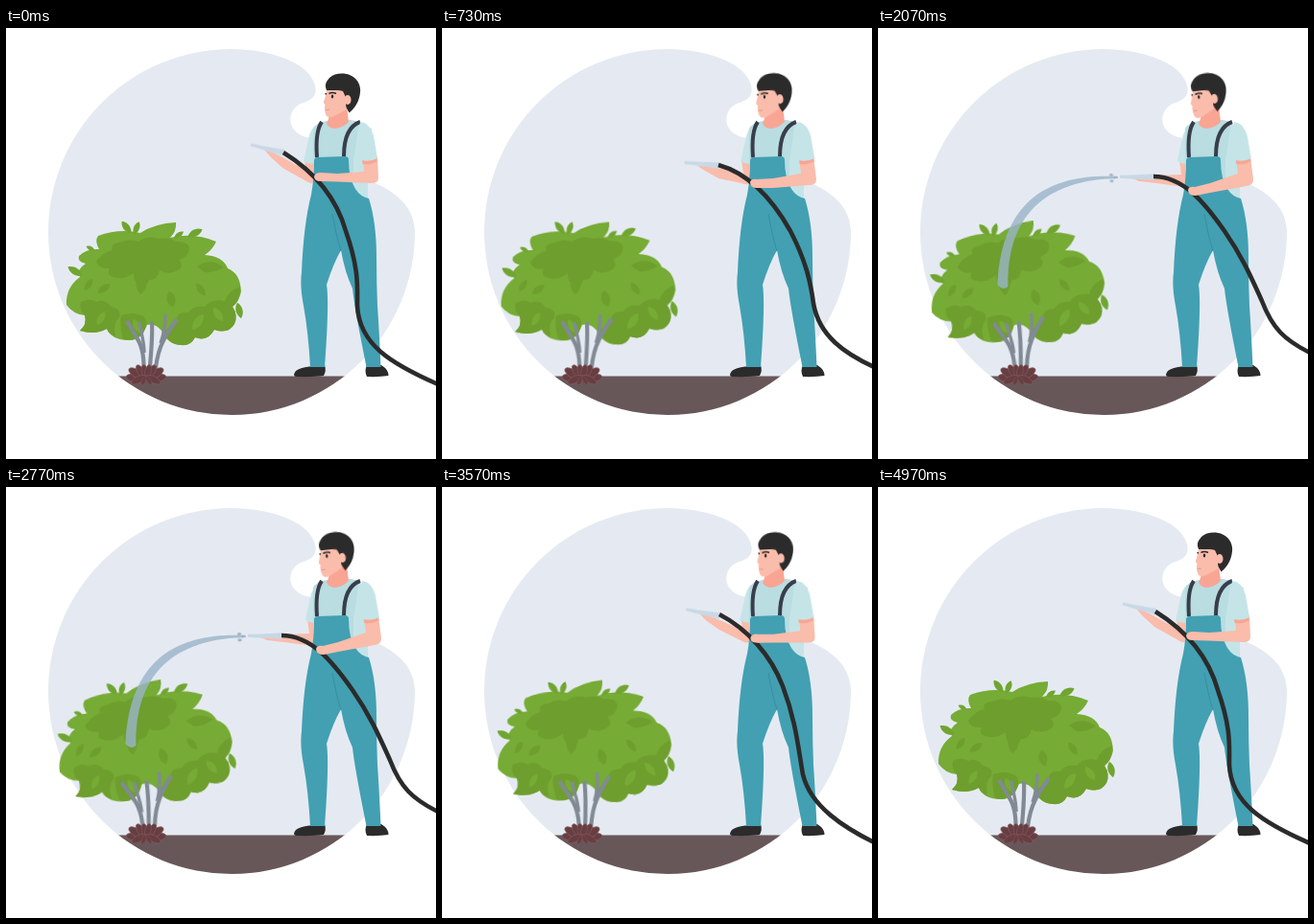
An HTML page that plays this animation: 448x450 px, repeating every 5.01 s.

```html
<!DOCTYPE html>
<html lang="en">
<head>
<meta charset="utf-8">
<title>Watering the bush</title>
<style>
html, body { margin: 0; width: 100%; height: 100%; overflow: hidden; background: #fff; }
svg { display: block; width: 100vw; height: 100vh; }

:root {
  /* hose: raised, lowering, level, rising, settling */
  --hose-up: path("M289 130C318 148 343 173 354 212C368 252 366 270 366 290C368 330 400 350 450 372");
  --hose-mid: path("M288 143C320 152 345 180 363 212C379 243 384 265 387 288C393 322 420 340 450 354");
  --hose-level: path("M287 155C318 155 340 182 361 212C381 241 390 263 400 285C411 314 424 326 450 339");
  --hose-rise: path("M289 133C318 148 343 176 355 208C369 245 371 272 376 300C384 334 420 356 450 371");
  --hose-settle: path("M289 129C318 148 343 173 354 208C368 246 364 270 366 290C370 332 408 356 450 376");

  --far-up: path("M269 127L275 128L290 136L313 149L311 138L321 138L322 160Q319 164 313 160L288 146L276 135Z");
  --far-mid: path("M266 144L275 144L292 147L314 152L312 138L322 138L322 160Q320 165 312 162L288 157L274 149Z");
  --far-level: path("M265 157L272 154L290 154L316 153L314 138L323 138L322 161Q320 166 312 165L290 162L272 160Z");

  --near-up: path("M372 136L387 134L388 157Q388 162 380 162L345 160.5L328 160Q321 160 321 155Q322 151 328 151L345 152L373 150Z");
  --near-mid: path("M372 136L387 134L390 158Q390 164 382 164L345 167L328 167Q321 167 321 161Q322 157 328 158L345 157L374 152Z");
  --near-level: path("M373 136L388 135L391 158Q391 164 384 165L346 172L331 175Q323 175 323 169Q324 165 330 166L346 162L375 152Z");
}

.skin { fill: #fabcab; }
.blush { fill: #f9a594; }
.shirt { fill: #c5e4e7; }
.dark { fill: #2b2b2b; }
.leaf { fill: #76ab35; }
.shade { fill: #6e9e2d; }

#bush, #head, #nozzle, #hose, #far, #near, .sleeve, #flow, #spray, .drop {
  animation: 5010ms linear infinite;
}
#bush { transform-origin: 148px 365px; animation-name: sway; animation-timing-function: ease-in-out; }
@keyframes sway { 50% { transform: rotate(-5.7deg); } }

#head { transform-origin: 344px 98px; animation-name: nod; }
@keyframes nod {
  0%, 4% { transform: translate(0, 0) rotate(0deg); animation-timing-function: ease-in-out; }
  21%, 61.5% { transform: translate(-3px, 0) rotate(-6deg); animation-timing-function: ease-in-out; }
  81%, 100% { transform: translate(0, 0) rotate(0deg); }
}

#nozzle { transform-origin: 289px 155px; animation-name: aim; }
@keyframes aim {
  0%, 4% { transform: translate(2px, -25px) rotate(13deg); animation-timing-function: ease-in; }
  14.57% { transform: translate(.5px, -12px) rotate(4.5deg); animation-timing-function: ease-out; }
  21.5%, 58.5% { transform: translate(0, 0) rotate(0deg); animation-timing-function: ease-in-out; }
  76.5%, 100% { transform: translate(2px, -25px) rotate(13deg); }
}

#far { animation-name: far; }
@keyframes far {
  0%, 4% { d: var(--far-up); animation-timing-function: ease-in; }
  14.57% { d: var(--far-mid); animation-timing-function: ease-out; }
  21.5%, 58.5% { d: var(--far-level); animation-timing-function: ease-in-out; }
  76.5%, 100% { d: var(--far-up); }
}
#near { animation-name: near; }
@keyframes near {
  0%, 4% { d: var(--near-up); animation-timing-function: ease-in; }
  14.57% { d: var(--near-mid); animation-timing-function: ease-out; }
  21.5%, 58.5% { d: var(--near-level); animation-timing-function: ease-in-out; }
  76.5%, 100% { d: var(--near-up); }
}
.sleeve { animation-name: sleeve; }
@keyframes sleeve {
  0%, 4% { transform: translate(0, 0); animation-timing-function: ease-in-out; }
  21.5%, 58.5% { transform: translate(1.8px, 0); animation-timing-function: ease-in-out; }
  76.5%, 100% { transform: translate(0, 0); }
}

#hose { fill: none; stroke: #2b2b2b; stroke-width: 4.6; animation-name: hose; }
@keyframes hose {
  0%, 4% { d: var(--hose-up); animation-timing-function: ease-in; }
  14.57% { d: var(--hose-mid); animation-timing-function: ease-out; }
  21.5%, 58.5% { d: var(--hose-level); animation-timing-function: ease-in; }
  71.26% { d: var(--hose-rise); animation-timing-function: ease-out; }
  84% { d: var(--hose-settle); animation-timing-function: ease-in-out; }
  100% { d: var(--hose-up); }
}

/* water runs out of the nozzle, then its tail follows */
#flow { stroke-dasharray: 100 120; animation-name: flow; }
@keyframes flow {
  0%, 26.2% { stroke-dashoffset: 101; }
  33.5%, 55.8% { stroke-dashoffset: 0; }
  60%, 100% { stroke-dashoffset: -101; }
}
#spray { animation-name: spray; animation-timing-function: step-end; }
@keyframes spray {
  0% { visibility: hidden; }
  26.2% { visibility: visible; }
  57% { visibility: hidden; }
}
.drop { transform-box: fill-box; transform-origin: center; animation-name: drop; animation-duration: 334ms; }
@keyframes drop {
  0%, 100% { transform: scale(.75); }
  50% { transform: scale(1.1); }
}
</style>
</head>
<body>
<svg viewBox="0 0 448 450">
  <defs>
    <path id="l" d="M0-8C5-3 4 4 0 8C-4 4-5-3 0-8Z"/>
    <path id="petal" d="M0 0C-5-5-5.500-14-2-20Q0-22 2-20C5.500-14 5-5 0 0Z"/>
    <path id="blob" d="M235 22C275 22 314 36 321 57C326 70 319 75 310 78C296 82 293 97 300 106C309 118 326 112 342 126C360 142 370 154 387 163C403 171 425 184 426 212A191 191 0 1 1 235 22Z"/>
    <clipPath id="round"><use href="#blob"/></clipPath>
    <mask id="reveal" maskUnits="userSpaceOnUse" x="100" y="130" width="170" height="160">
      <path id="flow" pathLength="100" fill="none" stroke="#fff" stroke-width="22" d="M251 156C195 154 130 170 130 274"/>
    </mask>
  </defs>

  <use href="#blob" fill="#e5eaf2"/>
  <path clip-path="url(#round)" fill="#685759" d="M40 363.400H430V410H40Z"/>

  <g id="bush">
    <path class="leaf" d="M140 214Q155 204 177 203Q178 212 171 219Q195 213 219 223Q215 232 207 237Q226 238 231 251Q244 256 245 275Q243 286 236 291Q242 300 238 309Q231 320 217 315Q210 328 197 323Q192 333 182 331Q168 330 162 316Q155 308 147 310Q140 327 128 326Q110 326 105 314Q93 321 77 316Q85 309 82 300Q70 299 63 289Q62 271 77 260Q73 252 83 246Q74 244 76 238Q84 230 97 231Q92 222 96 217Q118 209 140 214Z"/>
    <g class="shade">
      <path d="M94 244Q101 234 111 232Q108 225 119 224Q129 219 138 223Q148 216 159 220Q171 218 177 223Q191 222 191 231Q190 239 180 242Q187 249 177 254Q168 258 160 253Q158 263 149 263Q145 273 138 268Q132 263 133 256Q121 264 112 260Q104 258 108 251Q97 252 94 244Z"/>
      <path d="M244 270Q231 275 228 285Q214 282 207 291Q196 289 190 297Q178 295 177 307Q169 313 164 318Q170 331 183 331Q192 332 197 323Q210 328 217 315Q232 320 238 309Q242 300 236 291Q244 285 244 270Z"/>
      <path d="M78 286Q87 281 94 286Q103 282 109 291Q121 293 118 302Q111 307 114 322Q107 320 105 314Q93 321 77 316Q85 309 82 300Q76 294 78 286Z"/>
      <path d="M120 300Q134 295 144 302Q149 307 143 319Q134 328 122 325Q118 310 120 300Z"/>
      <path d="M199 249Q213 239 227 250Q217 256 207 255Z"/>
      <use href="#l" transform="translate(141 267)rotate(4)scale(1.6 1.4)"/>
      <use href="#l" transform="translate(172 283)rotate(-12)scale(1.3 1.1)"/>
      <use href="#l" transform="translate(203 273)rotate(-35)"/>
      <use href="#l" transform="translate(102 272)rotate(55)"/>
      <use href="#l" transform="translate(86 268)rotate(35)scale(.9)"/>
    </g>
    <g class="leaf">
      <use href="#l" transform="translate(200 307)rotate(35)scale(1.25)"/>
      <use href="#l" transform="translate(221 299)rotate(-35)scale(1.1)"/>
      <use href="#l" transform="translate(99 303)rotate(32)"/>
      <use href="#l" transform="translate(136 311)rotate(-25)"/>
    </g>
    <g fill="#70a531">
      <use href="#l" transform="translate(125.500 208)rotate(-38)"/>
      <use href="#l" transform="translate(136 209)rotate(22)scale(.9)"/>
      <use href="#l" transform="translate(88 230)rotate(-65)scale(.6)"/>
      <use href="#l" transform="translate(72 254)rotate(-58)scale(1.1)"/>
      <use href="#l" transform="translate(197 214)rotate(64)scale(1.05)"/>
      <use href="#l" transform="translate(180 216)rotate(55)scale(.75)"/>
      <use href="#l" transform="translate(243 295)rotate(-14)scale(1.05)"/>
    </g>
    <g fill="none" stroke="#818a94" stroke-width="4.200">
      <path d="M143 364C145 343 142 332 136 323L126 306"/>
      <path d="M149 364C151 340 153 325 152 307"/>
      <path d="M155 364C157 338 162 326 178 304"/>
      <path stroke-width="3.400" d="M144 339C144 327 141 320 139 307M161 329C165 318 166 311 166 299"/>
    </g>
  </g>

  <g fill="#673e42" stroke="#885d60" stroke-width=".7">
    <use href="#petal" transform="translate(146 367)rotate(-82)"/>
    <use href="#petal" transform="translate(146 367)rotate(82)"/>
    <use href="#petal" transform="translate(146 367)rotate(-58)"/>
    <use href="#petal" transform="translate(146 367)rotate(58)"/>
    <use href="#petal" transform="translate(146 367)rotate(-33)scale(.85)"/>
    <use href="#petal" transform="translate(146 367)rotate(33)scale(.85)"/>
    <use href="#petal" transform="translate(146 367)rotate(-10)scale(.75)"/>
    <use href="#petal" transform="translate(146 367)rotate(13)scale(.75)"/>
    <use href="#petal" transform="translate(146 363)rotate(-118)scale(.8)"/>
    <use href="#petal" transform="translate(146 363)rotate(118)scale(.8)"/>
    <use href="#petal" transform="translate(146 363)rotate(-155)scale(.5)"/>
    <use href="#petal" transform="translate(146 363)rotate(150)scale(.5)"/>
  </g>

  <path id="far" class="skin" d="M269 127L275 128L290 136L313 149L311 138L321 138L322 160Q319 164 313 160L288 146L276 135Z"/>

  <path class="dark" d="M302 364Q298 363 302 358Q306 354.500 316 353.500L332 352Q334 358 331 363Q323 364.500 302 364ZM376 364Q373 358 376 352H391Q399 357 398.500 363Q390 364.500 376 364Z"/>
  <path class="shirt sleeve" d="M330 99Q319 101 316 112L310 139Q316 143 322 141Z"/>
  <path class="shirt" d="M360 97L381 105L377 138V178L360 176Z"/>
  <path fill="#b9dde1" d="M334 97Q322 100 320 105V176H362V138L368 98L359 96Z"/>
  <path class="blush" d="M337 86L355 82L357 98Q350 105 342 105Q335 104 334 99Q337 95 337 86Z"/>
  <path fill="#42a0b2" d="M321 139Q321 135 325 135L353 134Q357 134 357 138Q357 157 364 168Q369 176 378 178Q386 203 386 240Q386 266 387 290Q389 320 390.500 354H375.500Q363 292 361 272Q353 255 349 232Q341 246 334 268Q337 286 332 354H317Q315 318 310 290Q306 270 308 255Q310 205 318 174Q321 158 321 139Z"/>
  <path fill="none" stroke="#378fa1" d="M340 194Q344 217 349 233"/>
  <path fill="none" stroke="#383e4b" stroke-width="4" d="M329 98Q322 108 324 135M369 98Q352 104 352 134"/>

  <g id="head">
    <path class="skin" d="M335 60C334 67 333 71 331 77Q330.500 79 332.500 80C331.500 84 332 87 333 90Q335 95 341 92.500L355 85L360 75L356 60Z"/>
    <path class="dark" d="M334 65C331 58 335 55 337 52C342 47 352 46.500 358 49C366 52 370 60 369 67C368.500 75 364 84 357.500 88.500L355 84C353 80 355 78 356 75Q353 71 351 66C346 64 340 65.500 334 65Z"/>
    <ellipse class="skin" cx="356" cy="75" rx="3.500" ry="5"/>
    <path fill="none" stroke="#2b2b2b" stroke-width="1.500" d="M336.500 68.500Q340 66.500 344 68.500M332.500 68.500L334 69"/>
    <ellipse class="dark" cx="340" cy="71.500" rx="1.200" ry="1.900"/>
    <path fill="none" stroke="#e69a8c" d="M333 85Q335 86 337 85"/>
  </g>

  <path id="nozzle" fill="#c8d8e6" d="M252 153.800L265 153.500L288 152.300V158.700L270 157.700L252 156.800Z"/>
  <path id="hose" d="M289 130C318 148 343 173 354 212C368 252 366 270 366 290C368 330 400 350 450 372"/>
  <path id="near" class="skin" d="M372 136L387 134L388 157Q388 162 380 162L345 160.500L328 160Q321 160 321 155Q322 151 328 151L345 152L373 150Z"/>
  <path class="blush sleeve" d="M371 137L386 135L386.500 139.500Q380 143 371.500 142Z"/>
  <path class="shirt sleeve" d="M369 98Q379 99 383 113L387 136Q380 140 370 138L367 110Z"/>

  <path mask="url(#reveal)" fill="#9ab4c8" fill-opacity=".8" d="M250 155C194 152 129 167 124.500 268Q130 275 135.500 270C134 177 197 158 250 157Z"/>
  <g id="spray" fill="#9cb5c7">
    <ellipse class="drop" cx="243" cy="153.500" rx="2.200" ry="1.600"/>
    <ellipse class="drop" cx="243.500" cy="159.800" rx="2.400" ry="1.500"/>
    <ellipse class="drop" cx="247" cy="156" rx="2" ry="1.500"/>
  </g>
</svg>
</body>
</html>
```
